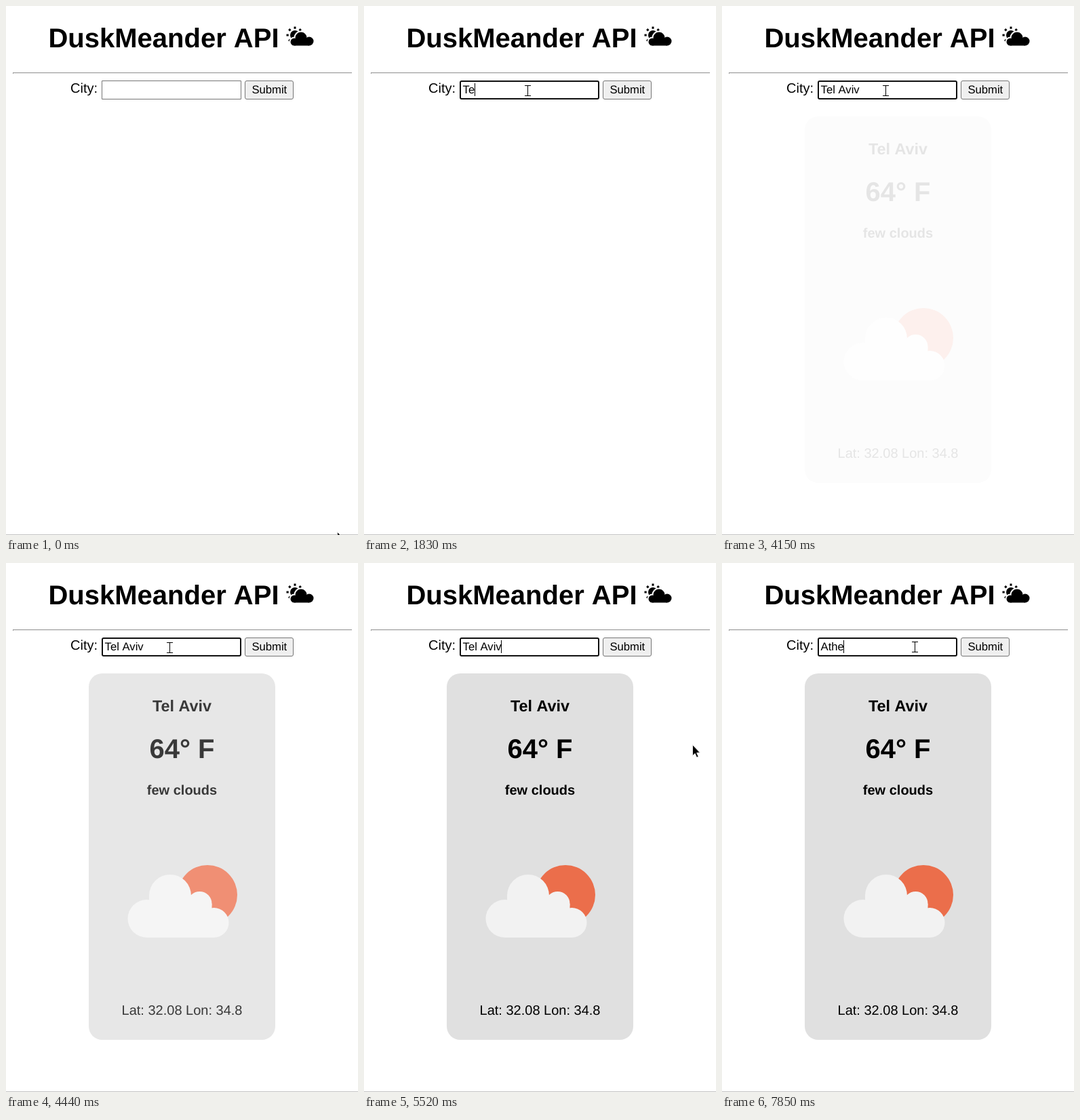
These frames come from a looping animation (519x781 px, 8 s). An HTML page with a canvas:

```html
<!DOCTYPE html>
<html lang="en">
<head>
<meta charset="utf-8">
<title>City weather</title>
<style>
  html, body { margin: 0; width: 100%; height: 100%; overflow: hidden; background: #fff; }
  canvas { display: block; }
</style>
</head>
<body>
<canvas id="stage" width="519" height="781"></canvas>
<script>
const ctx = document.getElementById('stage').getContext('2d');
const LOOP = 8000;
const MID = 259.5;
const FONT = '"Liberation Sans", Arial, sans-serif';
const FIELD_FONT = '16.667px ' + FONT;
const FIELD_X = 145.6;
const BASE = 129;

const typed = [
  [0, ''], [1520, 'T'], [1830, 'Te'], [2060, 'Tel'], [2290, 'Tel '],
  [2520, 'Tel A'], [2840, 'Tel Av'], [3300, 'Tel Avi'], [3450, 'Tel Aviv'],
  [7300, 'A'], [7620, 'At'], [7770, 'Ath'], [7850, 'Athe']
];
const caretOn = [[666, 1120], [1520, 4000], [4500, 5060], [5500, 5950], [7300, LOOP]];
const clicks = [[666, 740], [6080, 6150], [6230, 6380], [6530, 6610]];
const path = [
  [0, 488, 776], [590, 241, 125], [5080, 241, 125], [5450, 484, 268],
  [5560, 484, 268], [5860, 304, 126], [6050, 294, 126], [6170, 284, 124]
];

const within = (t, spans) => spans.some(([a, b]) => t >= a && t < b);
const lastBefore = (t, list) => list.filter(e => e[0] <= t).pop();
const widthOf = str => ctx.measureText(str).width;

// Draws word by word, so no kerning applies across spaces; returns the end x.
function text(str, x, y, font, color, align = 0) {
  ctx.font = font;
  ctx.fillStyle = color;
  const words = str.split(' ');
  const space = widthOf(' ');
  const total = words.reduce((sum, w) => sum + widthOf(w) + space, -space);
  x -= total * align;
  let at = x;
  for (const word of words) {
    ctx.fillText(word, at, y);
    at += widthOf(word) + space;
  }
  return x + total;
}

function rect(x, y, w, h, color) {
  ctx.fillStyle = color;
  ctx.fillRect(x, y, w, h);
}

function round(x, y, w, h, r) {
  ctx.beginPath();
  ctx.roundRect(x, y, w, h, r);
}

function disc(x, y, r, color) {
  ctx.fillStyle = color;
  ctx.beginPath();
  ctx.arc(x, y, r, 0, Math.PI * 2);
  ctx.fill();
}

function headingIcon() {
  const x = 426, y = 43;
  disc(x, y, 7, '#000');
  ctx.strokeStyle = '#000';
  ctx.lineWidth = 3;
  for (let i = 0; i < 8; i++) {
    const a = i * Math.PI / 4, c = Math.cos(a), s = Math.sin(a);
    ctx.beginPath();
    ctx.moveTo(x + c * 9.3, y + s * 9.3);
    ctx.lineTo(x + c * 12.5, y + s * 12.5);
    ctx.stroke();
  }
  // white pass leaves a gap between the sun and the cloud
  for (const [grow, color] of [[2, '#fff'], [0, '#000']]) {
    disc(425, 53, 5.5 + grow, color);
    disc(435, 47, 8.5 + grow, color);
    disc(447, 52, 6.5 + grow, color);
    rect(425, 50, 22, 8.5 + grow, color);
  }
}

function header() {
  text('DuskMeander API', 402.5, 61, 'bold 40px ' + FONT, '#000', 1);
  headingIcon();
  rect(10, 98, 500, 2, '#9a9a9a');
  rect(11, 99, 499, 1, '#eee');
  text('City:', 95, 128, '20px ' + FONT, '#000');
  ctx.lineWidth = 1;
  ctx.strokeStyle = '#767676';
  round(352.5, 110.5, 71, 27, 2.5);
  ctx.fillStyle = '#efefef';
  ctx.fill();
  ctx.stroke();
  text('Submit', 388.3, BASE, FIELD_FONT, '#000', 0.5);
  rect(0, 780, 519, 1, '#c3c3c3');
}

function field(t) {
  const focused = t >= 666;
  if (focused) {
    ctx.lineWidth = 2;
    ctx.strokeStyle = '#101010';
    round(142, 111, 204, 26, 2);
  } else {
    ctx.lineWidth = 1;
    ctx.strokeStyle = '#767676';
    round(141.5, 110.5, 205, 27, 0);
  }
  ctx.stroke();

  const value = lastBefore(t, typed)[1];
  const end = Math.floor(text(value, FIELD_X, BASE, FIELD_FONT, '#000'));
  if (within(t, caretOn)) rect(Math.max(146, end), 114, 1, 19, '#000');

  if (t >= 6230 && t < 7300) {
    const from = t < 6530 ? 171 : 146;
    ctx.save();
    ctx.beginPath();
    ctx.rect(from, 114, 203 - from, 19);
    ctx.clip();
    rect(from, 114, 203 - from, 19, '#3390ff');
    text(value, FIELD_X, BASE, FIELD_FONT, '#fff');
    ctx.restore();
  }
}

function cardAlpha(t) {
  if (t < 4150) return 0;
  const held = 4150 + Math.floor((t - 4150) / 72) * 72;
  const p = Math.min(1, (held - 4027) / 600);
  return 0.5 - 0.5 * Math.cos(Math.PI * p);
}

function card(alpha) {
  if (!alpha) return;
  const tint = (...rgb) => 'rgb(' + rgb.map(v => Math.round(255 + (v - 255) * alpha)) + ')';
  const ink = tint(0, 0, 0);
  const cloud = tint(242, 242, 242);

  round(122, 163, 275, 541, 20);
  ctx.fillStyle = tint(224, 224, 224);
  ctx.fill();
  text('Tel Aviv', MID, 219, 'bold 23.4px ' + FONT, ink, 0.5);
  text('64° F', MID, 288, 'bold 40px ' + FONT, ink, 0.5);
  text('few clouds', MID, 342, 'bold 20px ' + FONT, ink, 0.5);
  text('Lat: 32.08 Lon: 34.8', MID, 667, '20px ' + FONT, ink, 0.5);

  disc(297, 490, 44, tint(235, 110, 75));
  disc(207.5, 525, 28, cloud);
  disc(242, 491, 31, cloud);
  disc(285.5, 503, 18, cloud);
  disc(306.5, 531, 22, cloud);
  rect(211, 491, 62, 62, cloud);
  rect(207.5, 525, 78, 28, cloud);
  rect(270, 503, 33.5, 50, cloud);
  rect(285, 531, 21.5, 22, cloud);
}

function pointerAt(t) {
  // the pointer is sampled at a fixed interval
  const held = Math.max(0, Math.floor((t + 4.4) / 74.4) * 74.4 - 4.4);
  const i = path.filter(k => k[0] <= held).length - 1;
  const a = path[i], b = path[i + 1];
  if (!b) return [a[1], a[2]];
  const p = (held - a[0]) / (b[0] - a[0]);
  const e = p * p * (3 - 2 * p);
  return [a[1] + (b[1] - a[1]) * e, a[2] + (b[2] - a[2]) * e].map(Math.round);
}

function arrow(x, y) {
  const shape = [[0, 0], [0, 16], [3.6, 12.8], [6.1, 18.6], [8.6, 17.5], [6.1, 11.8], [10.8, 11.4]];
  ctx.beginPath();
  shape.forEach(([dx, dy]) => ctx.lineTo(x + 0.5 + dx, y + 0.5 + dy));
  ctx.closePath();
  ctx.fillStyle = '#000';
  ctx.fill();
  ctx.lineWidth = 1;
  ctx.strokeStyle = '#e4e4e4';
  ctx.stroke();
}

function beam(x, y) {
  rect(x, y - 7, 1, 14, '#000');
  rect(x - 4, y - 8, 9, 1, '#000');
  rect(x - 4, y + 7, 9, 1, '#000');
}

function pointer(t) {
  const [x, y] = pointerAt(t);
  if (within(t, clicks)) disc(x + 0.5, y, 15, 'rgba(255,255,0,0.47)');
  const overField = x >= 141 && x < 347 && y >= 110 && y < 138;
  (overField ? beam : arrow)(x, y);
}

function draw(t) {
  ctx.textRendering = 'geometricPrecision';
  rect(0, 0, 519, 781, '#fff');
  header();
  field(t);
  card(cardAlpha(t));
  pointer(t);
}

const start = performance.now();
function tick() {
  draw((performance.now() - start) % LOOP);
  requestAnimationFrame(tick);
}
tick();
</script>
</body>
</html>
```
